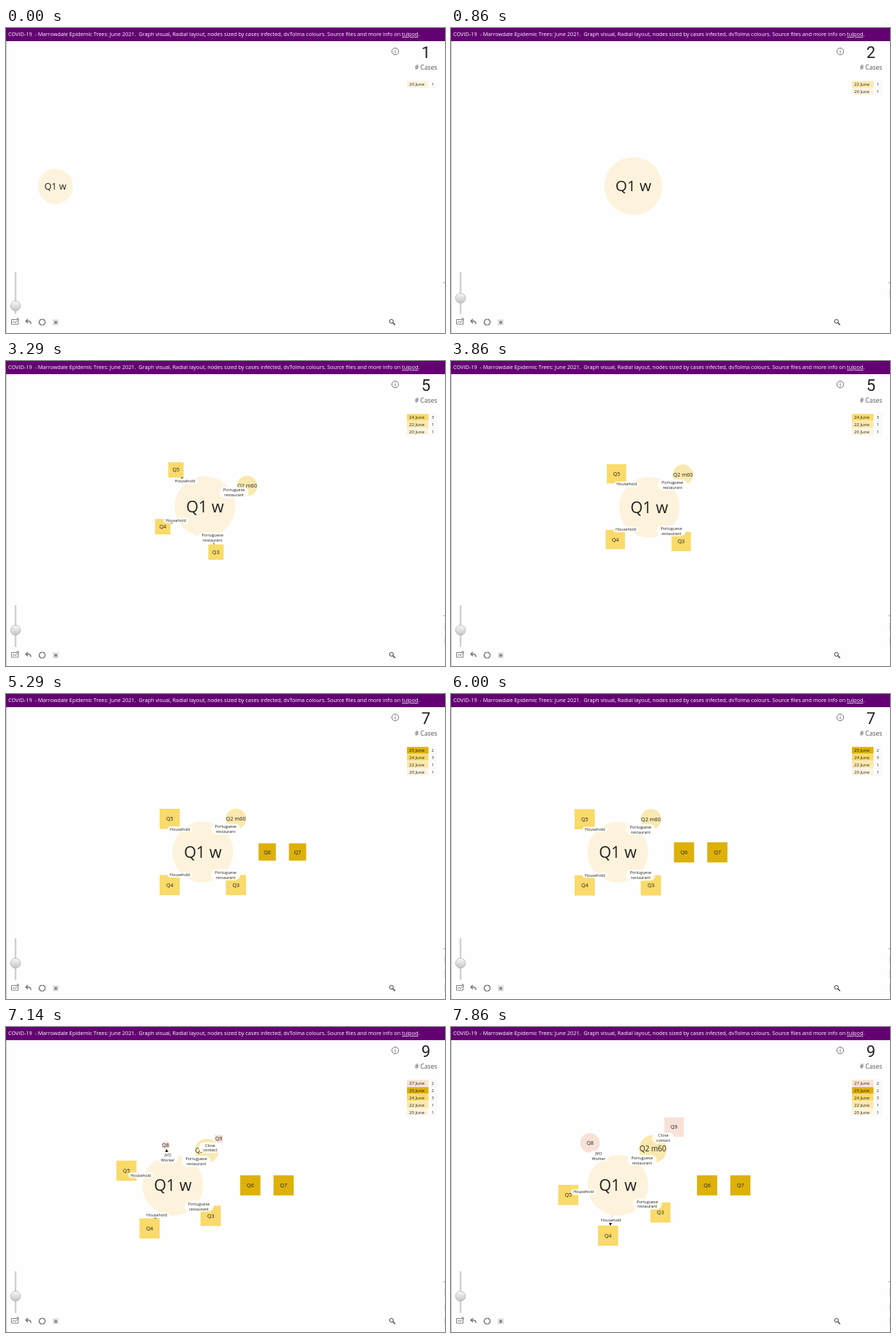
Animation, 600 px wide and 417 px high, one loop 8 s. Source, as an HTML page:

```html
<!DOCTYPE html>
<html lang="en">
<head>
<meta charset="utf-8">
<title>Outbreak graph</title>
<style>
  html, body { margin: 0; width: 100%; height: 100%; overflow: hidden; background: #fefefe; }
  svg { display: block; width: 100vw; height: 100vh; font-family: "Open Sans", "Noto Sans", sans-serif; }
  text { white-space: pre; fill: #222; }
  .mid { text-anchor: middle; }
  .title { font-size: 7.345px; fill: #fff; }
  .count { font: 22px Roboto, sans-serif; }
  .row { font-size: 6px; }
  .edge-label { font-size: 5.5px; }
  .icon { fill: none; stroke: #777; stroke-width: 1; }
</style>
</head>
<body>
<svg viewBox="0 0 600 417">
  <defs>
    <linearGradient id="knob" x2="0" y2="1">
      <stop offset="0" stop-color="#fafafa"/><stop offset="1" stop-color="#c4c4c4"/>
    </linearGradient>
  </defs>
  <rect width="600" height="417" fill="#fefefe"/>
  <path d="M.5 18V417" stroke="#c8c8c8"/>
  <rect width="600" height="18" fill="#640073"/>
  <text class="title" x="3" y="11.2">COVID-19  - Marrowdale Epidemic Trees: June 2021.  Graph visual, Radial layout, nodes sized by cases infected, dvTolma colours. Source files and more info on <tspan text-decoration="underline">tulpod</tspan>.</text>

  <g id="graph"></g>

  <circle cx="532" cy="32" r="4.6" class="icon" stroke-width=".8"/>
  <path d="M532 31v3.6M532 29.2v1" class="icon"/>
  <text id="count" class="count mid" x="574" y="40.7"></text>
  <text class="mid" x="574" y="57" font-size="8.5" style="fill:#555"># Cases</text>
  <g id="list"></g>
  <path d="M598 349l2-1.5" stroke="#888" stroke-width=".9"/>
  <g id="ticks" stroke="#ddd"></g>

  <path d="M13 334V391" stroke="#d0d0d0" stroke-width="2.4"/>
  <circle id="handle" cx="13" r="6.8" fill="url(#knob)" stroke="#aaa" stroke-width=".7"/>
  <g class="icon">
    <path d="M7.5 398.5h9v6.5h-9zM9 403l2-2 2 2 2-3M14.5 397h2.5v3" stroke-width=".9"/>
    <path d="M30 398l-3 2.8 3 2.8M27.5 400.8h3.5q3 .3 3 4" stroke-width="1.4"/>
    <path d="M46 404.5a4 4 0 0 1 3-6.2M53 400.2a4 4 0 0 1-3.5 6M49.5 398.3q2.5 0 3.5 2M49 406.2q-2 0-3-1.8" stroke-width="1.4"/>
    <path d="M64.8 399.2h6.4v6.4h-6.4z" stroke="#aaa" stroke-dasharray="1.2 .8"/>
    <path d="M66.5 401h3v3h-3z" fill="#888" stroke="#888"/>
    <circle cx="526.8" cy="401" r="2.6" stroke="#444"/>
    <path d="M528.8 403l3 3" stroke="#444" stroke-width="1.5"/>
  </g>
</svg>
<script>
const FPS = 7, FRAMES = 56, BLANK = 2;
const COLOURS = ['#fdf3dc', '#fae8ae', '#f9da6a', '#deb00a', '#f8e1d6'];

// Each step: first frame, total cases, date, cases on that date
const steps = [
  [0, 1, 20, 1], [4, 2, 22, 1], [17, 5, 24, 3], [33, 7, 25, 2], [46, 9, 27, 2]
];

// Hub keys: frame, x, y, radius
const hub = [
  [0, 67.5, 216.5, 24], [2, 67.5, 216.5, 24], [8, 272, 216, 41.5], [19, 272, 216, 41.5],
  [23, 272, 199, 41.5], [27, 271, 200, 41.5], [31, 269.5, 216, 41.5],
  [37, 269, 216, 41.5], [42, 228, 216.5, 41.5]
];

// Satellite keys: frame, angle, distance from hub, half size
const satellites = [
  { name: 'Q2 m60', tone: 1, round: true, label: ['Portuguese', 'restaurant'], keys: [
    [9, 90, 45, 2], [13, 90, 62.5, 12], [15, 90, 64, 13.8], [19, 90, 64, 13.8],
    [23, -26, 64, 14], [27, -44, 64, 14], [30, -45, 64, 14], [48, -45, 64, 14], [55, -46, 69, 19]] },
  { name: 'Q3', tone: 2, label: ['Portuguese', 'restaurant'], keys: [
    [19, 100, 50, 2], [23, 76.5, 64, 10.5], [27, 47, 64, 13.2], [30, 45, 64, 13.8],
    [48, 45, 64, 13.8], [55, 32.5, 69, 13.8]] },
  { name: 'Q4', tone: 2, label: ['Household'], keys: [
    [19, 170, 50, 2], [23, 154.5, 64, 10.5], [27, 136.5, 64, 13.2], [30, 135, 64, 13.8],
    [48, 135, 64, 13.8], [55, 101, 70, 13.8]] },
  { name: 'Q5', tone: 2, label: ['Household'], keys: [
    [19, 240, 50, 2], [23, 231.6, 64, 10.5], [27, 225.6, 64, 13.2], [30, 225, 64, 13.8],
    [48, 225, 64, 13.8], [55, 169, 69, 13.8]] },
  { name: 'Q6', tone: 3, keys: [[35, 0, 86, 3], [37, 0, 88, 11.8], [41, 0, 90.5, 13.8],
    [48, 0, 90.5, 13.8], [55, 0, 122, 13.8]] },
  { name: 'Q7', tone: 3, keys: [[35, 0, 118, 3], [37, 0, 129.5, 11.8], [41, 0, 136, 13.8],
    [48, 0, 136, 13.8], [55, 0, 167.5, 13.8]] },
  { name: 'Q8', tone: 4, round: true, label: ['JVO', 'Worker'], keys: [
    [49, 270, 50, 2], [55, 236.8, 69.3, 13.4]] },
  { name: 'Q9', tone: 4, label: ['Close', 'contact'], from: 88, labelAt: .81, keys: [
    [49, -45, 80, 2], [55, -46, 110.7, 13.4]] }
];

const byId = id => document.getElementById(id);

function pose(keys, frame) {
  const next = keys.findIndex(key => key[0] > frame);
  if (next < 0) return keys[keys.length - 1].slice(1);
  const a = keys[next - 1], b = keys[next];
  const p = (frame - a[0]) / (b[0] - a[0]);
  const eased = p * (2 - p);
  return a.slice(1).map((v, i) => v + (b[i + 1] - v) * eased);
}

const text = (x, y, size, str) =>
  `<text class="mid" x="${x}" y="${y + size * .35}" font-size="${size}">${str}</text>`;

function shape(node, x, y, half) {
  const fill = COLOURS[node.tone];
  const body = node.round
    ? `<circle cx="${x}" cy="${y}" r="${half}" fill="${fill}"/>`
    : `<rect x="${x - half}" y="${y - half}" width="${half * 2}" height="${half * 2}" fill="${fill}"/>`;
  return body + text(x, y, Math.max(7.15, half * .52), node.name);
}

function edge(x, y, angle, start, tip) {
  return `<g transform="translate(${x} ${y}) rotate(${angle})">
    <path d="M${start} 0H${tip}" stroke="#999" stroke-width=".5"/>
    <path d="M${tip} 0l-4 -2.2v4.4z" fill="#111"/></g>`;
}

function pill(lines, x, y) {
  const two = lines.length > 1;
  const w = two ? Math.max(...lines.map(s => s.length)) * 3 + 10 : 34;
  const h = two ? 15 : 7.6;
  const rows = lines.map((s, i) =>
    `<text class="mid edge-label" x="${x}" y="${y + 1.9 + (i - (lines.length - 1) / 2) * 6.8}">${s}</text>`);
  return `<rect x="${x - w / 2}" y="${y - h / 2}" width="${w}" height="${h}" rx="${h / 2}"
    fill="#fff" fill-opacity=".9"/>` + rows.join('');
}

function drawGraph(frame) {
  const [cx, cy, radius] = pose(hub, frame);
  let edges = '', nodes = '', labels = '';
  for (const node of satellites) {
    if (frame < node.keys[0][0]) continue;
    const [angle, dist, half] = pose(node.keys, frame);
    const rad = angle * Math.PI / 180;
    const at = d => [cx + d * Math.cos(rad), cy + d * Math.sin(rad)];
    nodes += shape(node, ...at(dist), half);
    if (!node.label) continue;
    edges += edge(cx, cy, angle, node.from || radius, dist - half);
    labels += pill(node.label, ...at(dist * (node.labelAt || .69)));
  }
  byId('graph').innerHTML =
    shape({ name: 'Q1 w', tone: 0, round: true }, cx, cy, radius) + edges + nodes + labels;
  byId('handle').setAttribute('cy', 380 - (radius - 24) / 17.5 * 12);
}

function drawList(frame) {
  const shown = steps.filter(step => step[0] <= frame);
  const [since, total] = shown[shown.length - 1];
  const loading = since > 0 && frame < since + BLANK;
  byId('count').textContent = total;
  byId('list').innerHTML = loading ? '' : shown.map(([, , day, cases], i) => {
    const y = 72.4 + (shown.length - 1 - i) * 9.8;
    return `<rect x="548" y="${y}" width="29.5" height="9.2" fill="${COLOURS[i]}"/>
      <path d="M578.5 ${y}h9.5v9.2h-9.5" fill="none" stroke="#eee" stroke-width=".6"/>
      <text class="row" x="551" y="${y + 6.9}">${day} June</text>
      <text class="row mid" x="583.2" y="${y + 6.9}">${cases}</text>`;
  }).join('');
  byId('ticks').innerHTML = loading ? '' : shown.slice(1, 4)
    .map((_, i) => `<path d="M599.5 ${358 + i * 19.5}v10"/>`).join('');
}

const start = performance.now();
let last = -1;
function tick() {
  const seconds = (performance.now() - start) / 1000;
  const frame = Math.floor(seconds * FPS + .05) % FRAMES;
  if (frame !== last) {
    drawGraph(frame);
    drawList(frame);
    last = frame;
  }
  requestAnimationFrame(tick);
}
tick();
</script>
</body>
</html>
```
